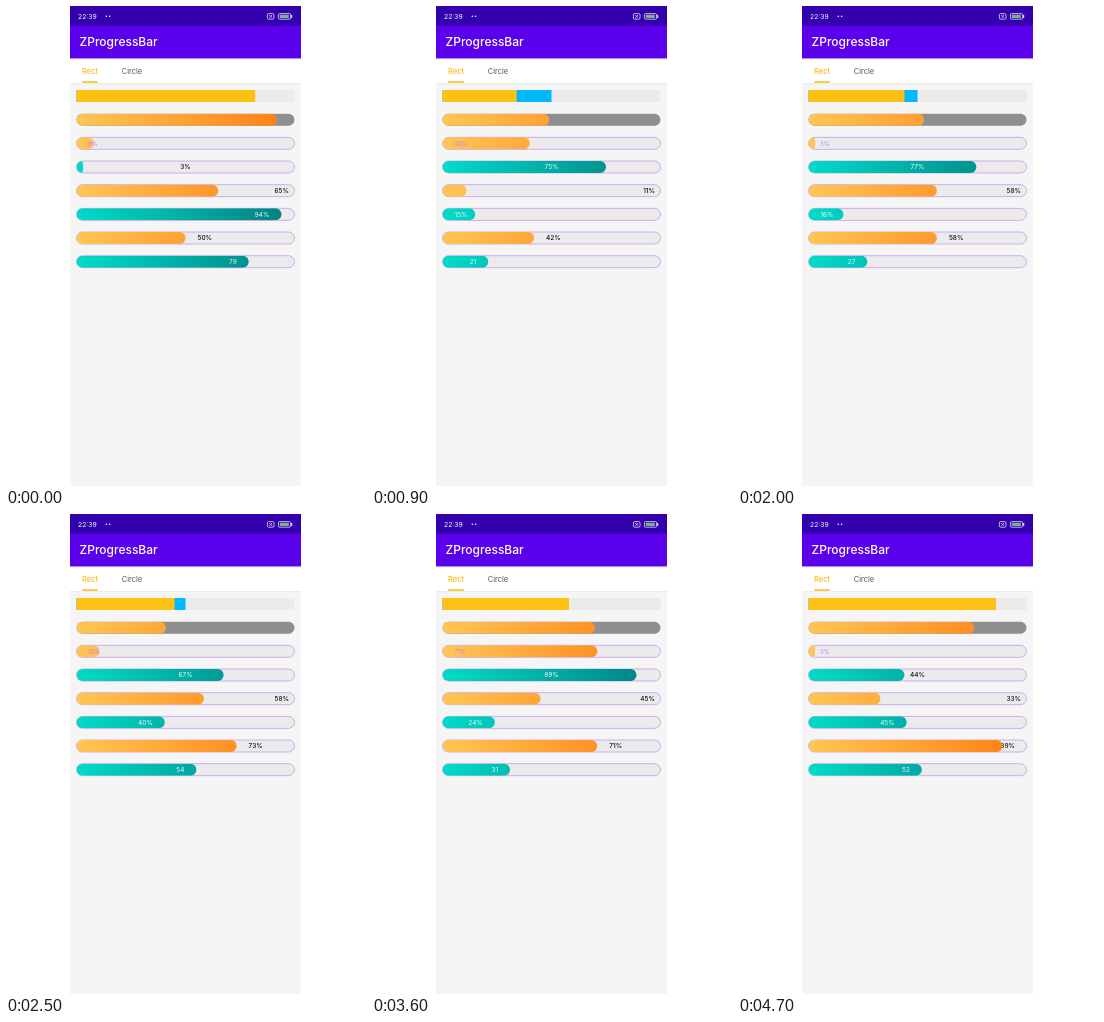
Animation, 360 px wide and 480 px high, one loop 4.8 s. Source, as an HTML page:

```html
<!DOCTYPE html>
<html lang="en">
<head>
<meta charset="utf-8">
<title>Progress bars</title>
<style>
  html, body { margin: 0; width: 100%; height: 100%; overflow: hidden; background: #fff; }
  svg { display: block; width: 360px; height: 480px; font: 6.5px Inter, Roboto, sans-serif; }
</style>
</head>
<body>
<svg id="stage" viewBox="0 0 360 480">
  <defs>
    <linearGradient id="orange" gradientUnits="userSpaceOnUse" x1="70" x2="289" y1="0" y2="0">
      <stop stop-color="#ffc654"/><stop offset="1" stop-color="#ff7c12"/>
    </linearGradient>
    <linearGradient id="teal" gradientUnits="userSpaceOnUse" x1="70" x2="289" y1="0" y2="0">
      <stop stop-color="#00dcc8"/><stop offset="1" stop-color="#007c7e"/>
    </linearGradient>
    <linearGradient id="shade" x2="0" y2="1">
      <stop stop-color="#000" stop-opacity=".12"/><stop offset="1" stop-color="#000" stop-opacity="0"/>
    </linearGradient>
  </defs>
  <rect x="64" width="231" height="480" fill="#f5f5f5"/>
  <rect x="64" y="52" width="231" height="25.5" fill="#fff"/>
  <rect x="64" y="52.4" width="231" height="2" fill="url(#shade)"/>
  <rect x="64" y="77" width="231" height=".8" fill="#e9e9e9"/>
  <rect x="64" width="231" height="52.4" fill="#5b00eb"/>
  <rect x="64" width="231" height="19.5" fill="#3300ae"/>
  <g fill="#fff">
    <text x="72" y="13" font-size="6.8">22:39</text>
    <circle cx="100.3" cy="10.3" r=".8"/><circle cx="103.6" cy="10.3" r=".8"/>
    <text x="73.5" y="40.3" font-size="12" font-weight="500">ZProgressBar</text>
    <rect x="285.2" y="9" width="1" height="3"/>
  </g>
  <g fill="none" stroke="#e4dcf8" stroke-width=".8">
    <rect x="261.4" y="7.6" width="6.6" height="5.6" rx="1.3"/>
    <path d="M263.4 9l2.6 2.8m0-2.8l-2.6 2.8"/>
    <rect x="272.4" y="7.6" width="12.2" height="5.6" rx="1.3"/>
  </g>
  <rect x="273.8" y="8.8" width="9" height="3.2" rx=".5" fill="#77b48c"/>
  <text x="76" y="67.7" font-size="7.5" font-weight="500" fill="#fdb913">Rect</text>
  <text x="115.7" y="67.7" font-size="7.5" fill="#555">Circle</text>
  <rect x="76" y="75.2" width="16" height="1.6" rx=".8" fill="#fdb913"/>
</svg>
<script>
const LOOP = 4800, STEP = 100;             // the picture refreshes ten times a second
const CYCLE = 505, MOVE = 310, LEAD = 130; // each cycle: ease onwards, then rest
const LEFT = 70.5, WIDTH = 218, HEIGHT = 12, INSET = 11.5;
const stage = document.getElementById('stage');

// Key percentages of each bar; between them the bars advance in eased cycles
const keys = [0, 900, 2000, 3000, 3600, 4400, 4700].map(progress);
const bars = [
  { v: [82, 34, 44, 46, 58, 20, 86] },
  { fill: 'orange', track: '#8f8f8f', v: [92, 49, 53, 29, 70, 35, 76] },
  { fill: 'orange', label: 'start', v: [8, 40, 3, 18, 71, 66, 3] },
  { fill: 'teal', label: 'middle', v: [3, 75, 77, 58, 89, 41, 44] },
  { fill: 'orange', label: 'end', v: [65, 11, 58.9, 58, 45, 73, 33] },
  { fill: 'teal', label: 'inside', v: [94, 15, 16, 65, 24, 93, 45] },
  { fill: 'orange', label: 'outside', v: [50, 42, 58.9, 88, 71, 29, 89] },
  { fill: 'teal', label: 'inside', unit: '', v: [79, 21, 27, 83, 31, 94, 52] }
];

// Number of cycles passed, easing in and out of a rest
function progress(time) {
  const cycles = (time + LEAD) / CYCLE;
  const k = Math.floor(cycles);
  const p = Math.min(1, (cycles - k) * CYCLE / MOVE);
  return k + (1 - Math.cos(Math.PI * p)) / 2;
}

function add(name, attrs, parent = stage) {
  const el = document.createElementNS('http://www.w3.org/2000/svg', name);
  set(el, attrs);
  parent.append(el);
  return el;
}

function set(el, attrs) {
  for (const key in attrs) el.setAttribute(key, attrs[key]);
}

function build(bar, i) {
  const y = 84 + i * 23.67;
  const box = { x: LEFT, y, width: WIDTH, height: HEIGHT, rx: bar.fill ? HEIGHT / 2 : 0 };
  add('rect', { ...box, fill: bar.track || '#ebebeb' });
  if (!bar.fill) {
    add('rect', { ...box, width: WIDTH / 2, fill: '#00b8ff' });
    bar.el = add('rect', { ...box, fill: '#ffc014' });
    return;
  }
  if (bar.label) add('rect', { ...box, fill: 'none', stroke: '#c59af2', 'stroke-width': .8 });
  const addText = () => { bar.text = add('text', { y: y + 8.3 }); };
  if (bar.label === 'outside') addText();   // the fill may cover this one
  add('rect', box, add('clipPath', { id: 'clip' + i }));
  bar.el = add('rect', { ...box, fill: `url(#${bar.fill})` },
    add('g', { 'clip-path': `url(#clip${i})` }));
  if (bar.label && !bar.text) addText();
}

function place(label, value, end) {
  const dark = { fill: '#111', 'font-weight': 500 };
  const light = { fill: '#eefaf8', 'font-weight': 400 };
  const min = LEFT + INSET, max = LEFT + WIDTH - INSET;
  switch (label) {
    case 'start': return { x: min, 'font-size': 6, fill: '#bb86fc' };
    case 'middle': return { x: 179.5, 'text-anchor': 'middle', ...(value < 50 ? dark : light) };
    case 'end': return { x: 283, 'text-anchor': 'end', ...dark };
    case 'inside': return { x: Math.max(min + 13.5, end - INSET - .5), 'text-anchor': 'end', ...light };
    default: return end + INSET + 14.5 > max
      ? { x: max, 'text-anchor': 'end', ...dark }
      : { x: end + INSET + .5, 'text-anchor': 'start', ...dark };
  }
}

function draw(time) {
  const now = progress(time);
  const i = keys.findLastIndex((key, n) => key <= now && n < keys.length - 1);
  const mix = (now - keys[i]) / (keys[i + 1] - keys[i]);
  for (const { v, fill, label, unit = '%', el, text } of bars) {
    const value = v[i] + (v[i + 1] - v[i]) * mix;
    const width = WIDTH * value / 100;
    const radius = fill ? Math.min(HEIGHT, width) / 2 : 0;
    set(el, { width, rx: radius, ry: radius });
    if (!text) continue;
    text.textContent = Math.floor(value + 1e-6) + unit;
    set(text, place(label, value, LEFT + width));
  }
}

function frame() {
  draw(Math.floor((performance.now() + 10) / STEP) * STEP % LOOP);
  requestAnimationFrame(frame);
}

bars.forEach(build);
frame();
</script>
</body>
</html>
```
